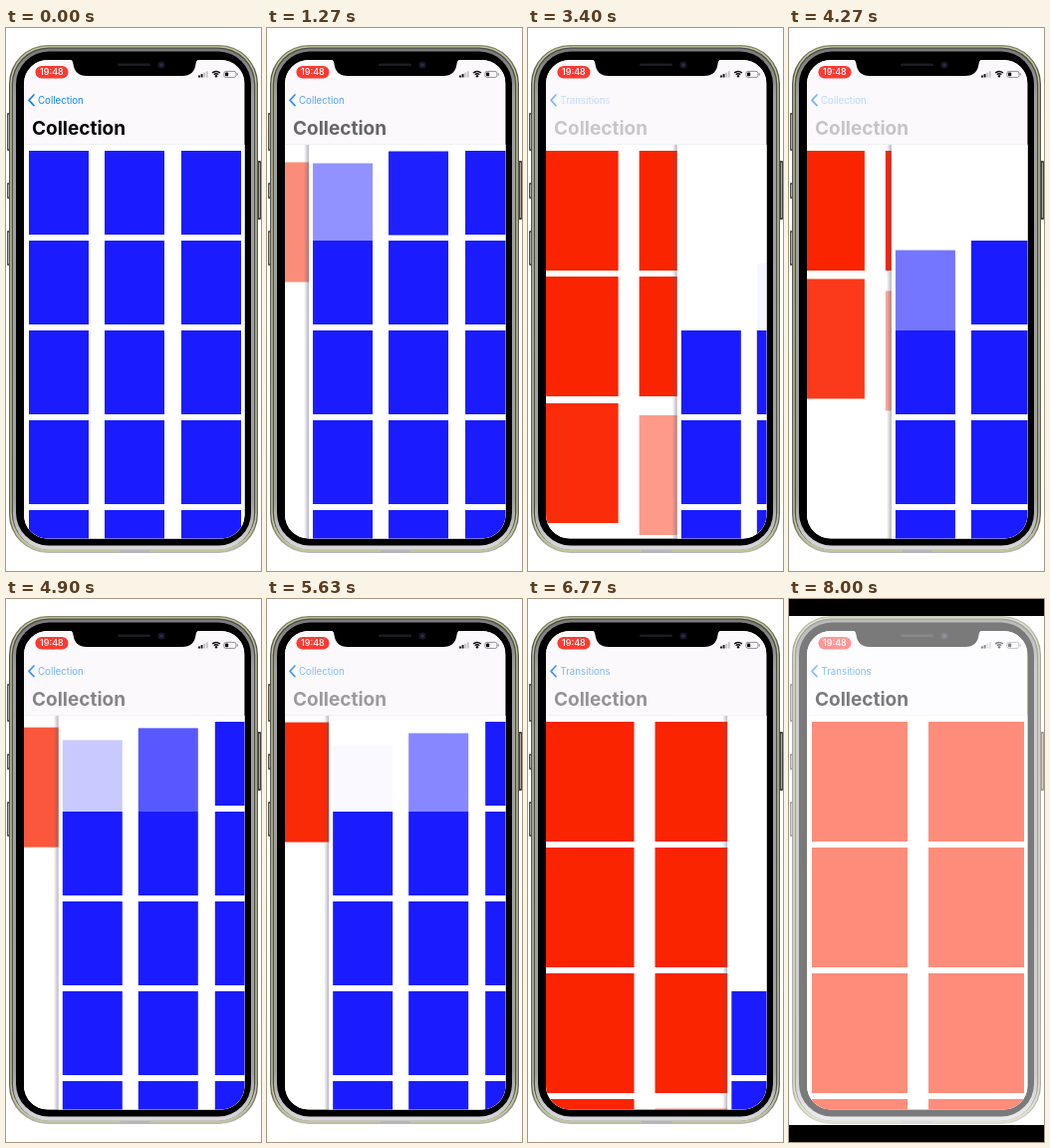
Write an HTML page with a canvas that moves like this. It is 256x544 px and loops after 8030 ms.

```html
<!DOCTYPE html>
<html lang="en">
<head>
<meta charset="utf-8">
<title>Collection transition</title>
<style>
  html, body { margin: 0; width: 100%; height: 100%; overflow: hidden; background: #fff; }
  canvas { display: block; width: 256px; height: 544px; }
</style>
</head>
<body>
<canvas id="stage" width="256" height="544"></canvas>
<script>
const ctx = document.getElementById('stage').getContext('2d');
const LOOP = 8030;
const SCREEN = { x: 18, y: 32, w: 221.5, h: 479.5, r: 24 };
const WIDTH = 221, NAV_BOTTOM = 117, DROP = 24, PARALLAX = 69.5;
const FONT = 'Inter, Roboto, sans-serif';
const BLUE_GRID = { color: '#1a1cff', xs: [23, 99, 176], w: 60, h: 84, step: 90, rows: 5 };
const RED_GRID = { color: '#fa2400', xs: [23, 140], w: 96, h: 120, step: 126, rows: 4 };

// Swipe progress: [time, progress, slope per second]
const SWIPE = [
  [250, 0, 0], [1270, 0.104, 0.25], [2370, 0.505, 0.28], [3050, 0.62, 0],
  [4270, 0.38, -0.28], [5130, 0.12, 0], [5630, 0.195, 0.35],
  [6770, 0.82, 0.55], [7300, 1, 0]
];

const clamp = v => Math.max(0, Math.min(1, v));

function progressAt(t) {
  if (t <= SWIPE[0][0]) return 0;
  for (let i = 1; i < SWIPE.length; i++) {
    const [t0, p0, m0] = SWIPE[i - 1], [t1, p1, m1] = SWIPE[i];
    if (t > t1) continue;
    const d = (t1 - t0) / 1000, u = (t - t0) / (t1 - t0), v = 1 - u;
    return clamp(v * v * (1 + 2 * u) * p0 + u * v * v * d * m0 +
      u * u * (3 - 2 * u) * p1 - u * u * v * d * m1);
  }
  return 1;
}

function rounded(x, y, w, h, r) {
  ctx.beginPath();
  ctx.roundRect(x, y, w, h, r);
}

function fillRounded(color, x, y, w, h, r) {
  ctx.fillStyle = color;
  rounded(x, y, w, h, r);
  ctx.fill();
}

function fillBox(color, x, y, w, h) {
  ctx.fillStyle = color;
  ctx.fillRect(x, y, w, h);
}

function label(text, x, y, font, color, alpha = 1) {
  ctx.globalAlpha = alpha;
  ctx.font = `${font} ${FONT}`;
  ctx.fillStyle = color;
  ctx.fillText(text, x, y);
  ctx.globalAlpha = 1;
}

// Cells come or go one after another while sliding vertically
function drawGrid(grid, p, dx, entering) {
  const cols = grid.xs.length;
  ctx.fillStyle = grid.color;
  for (let i = 0; i < grid.rows * cols; i++) {
    const k = clamp((p - i * 0.1) / 0.2);
    const alpha = entering ? (p >= 1 ? 1 : k) : 1 - k;
    if (alpha <= 0) continue;
    const x = grid.xs[i % cols] + dx;
    const y = 123 + Math.floor(i / cols) * grid.step + (1 - alpha) * DROP * 1;
    const next = 123 + (Math.floor(i / cols) + 1) * grid.step;
    const h = entering ? grid.h : Math.min(grid.h, next - y);
    ctx.globalAlpha = alpha;
    ctx.fillRect(x, y, grid.w, h);
  }
  ctx.globalAlpha = 1;
}

function drawCollections(p) {
  const edge = SCREEN.x + p * WIDTH;
  ctx.save();
  ctx.beginPath();
  ctx.rect(SCREEN.x, NAV_BOTTOM, WIDTH + 1, 400);
  ctx.clip();
  fillBox('#fff', SCREEN.x, NAV_BOTTOM, WIDTH + 1, 400);
  if (p > 0) drawGrid(RED_GRID, p, -PARALLAX * (1 - p), true);
  if (p < 1) {
    if (p > 0) {
      const shade = ctx.createLinearGradient(edge - 4, 0, edge + 1, 0);
      shade.addColorStop(0, 'rgba(90,90,110,0)');
      shade.addColorStop(1, 'rgba(90,90,110,0.45)');
      fillBox(shade, edge - 4, NAV_BOTTOM, 5, 400);
    }
    fillBox('#fff', edge + 1, NAV_BOTTOM, WIDTH, 400);
    drawGrid(BLUE_GRID, p, p * WIDTH, false);
  }
  ctx.restore();
}

function drawNav(p) {
  const away = Math.abs(1 - 2 * p);
  fillBox('#fbf9fc', SCREEN.x, SCREEN.y, SCREEN.w, NAV_BOTTOM - SCREEN.y);
  fillBox('#e9e7ec', SCREEN.x, NAV_BOTTOM - 0.5, SCREEN.w, 0.5);
  ctx.globalAlpha = 0.45 + 0.55 * away;
  ctx.strokeStyle = '#1683f5';
  ctx.lineWidth = 1.7;
  ctx.lineCap = ctx.lineJoin = 'round';
  ctx.beginPath();
  ctx.moveTo(28, 67);
  ctx.lineTo(23, 72.3);
  ctx.lineTo(28, 77.6);
  ctx.stroke();
  label('Collection', 32, 76, '9.7px', '#1683f5', (1 - p) ** 3);
  label('Transitions', 32.5, 76, '9.7px', '#1683f5', p ** 3);
  label('Collection', 26, 107, '700 19px', '#000', 0.2 + 0.8 * away ** 3);
}

function drawStatus() {
  fillRounded('#fb3a32', 29.5, 38, 33, 12.5, 6.2);
  label('19:48', 34, 47.4, '500 9px', '#fff');
  for (let i = 0; i < 4; i++) {
    fillBox(i < 2 ? '#111' : '#c4c4c8', 193 + i * 2.6, 47.5 - i * 1.4, 1.9, 2 + i * 1.4);
  }
  ctx.strokeStyle = '#111';
  ctx.lineCap = 'butt';
  ctx.lineWidth = 1.5;
  for (const r of [3, 5.3]) {
    ctx.beginPath();
    ctx.arc(211, 48.7, r, -Math.PI * 0.76, -Math.PI * 0.24);
    ctx.stroke();
  }
  ctx.fillStyle = '#111';
  ctx.beginPath();
  ctx.arc(211, 48.3, 1.2, 0, 7);
  ctx.fill();
  ctx.strokeStyle = '#77777c';
  ctx.lineWidth = 0.8;
  rounded(218.9, 43.4, 12, 6, 1.8);
  ctx.stroke();
  fillRounded('#111', 220, 44.5, 3.2, 3.8, 0.8);
  fillBox('#77777c', 231.7, 45.3, 1, 2.2);
}

function drawBody() {
  for (const [y, h] of [[85, 38], [155, 16], [203, 35]]) {
    fillRounded('#555', 1, y, 4, h, 1);
    fillBox('#aaa', 2, y + 2, 1, h - 4);
  }
  fillRounded('#444', 251, 133, 5, 59, 1);
  fillBox('#aaa', 254, 135, 1, 55);

  const rim = ctx.createLinearGradient(0, 17, 0, 526);
  rim.addColorStop(0, '#85866a');
  rim.addColorStop(0.06, '#55564a');
  rim.addColorStop(0.94, '#66675a');
  rim.addColorStop(1, '#b8b8bc');
  fillRounded(rim, 3, 17, 250, 509, 39);
  fillRounded('#c5c79a', 4.3, 18.2, 247.4, 506.5, 38);
  fillRounded('#4c4c4c', 5.7, 19.5, 244.6, 503, 37);
  const metal = ctx.createLinearGradient(0, 20, 0, 524);
  metal.addColorStop(0, '#7a7a7a');
  metal.addColorStop(0.1, '#a0a0a0');
  metal.addColorStop(0.9, '#a0a0a0');
  metal.addColorStop(1, '#dcdce0');
  fillRounded(metal, 7, 20.8, 242, 502, 36);
  fillRounded('#000', 10, 23.5, 236, 495, 33);
  fillBox('#b5b5ba', 114, 523, 30, 3);
}

function drawNotch() {
  ctx.fillStyle = '#000';
  ctx.beginPath();
  ctx.moveTo(62, 31);
  ctx.quadraticCurveTo(67, 31, 67.5, 36);
  ctx.quadraticCurveTo(69, 48, 81, 48);
  ctx.lineTo(177, 48);
  ctx.quadraticCurveTo(189, 48, 190.5, 36);
  ctx.quadraticCurveTo(191, 31, 196, 31);
  ctx.fill();
  fillRounded('#1c1c22', 112, 35.5, 33, 2.5, 1.2);
  ctx.fillStyle = '#17172a';
  ctx.beginPath();
  ctx.arc(156, 37, 3.6, 0, 7);
  ctx.fill();
  ctx.fillStyle = '#30304c';
  ctx.beginPath();
  ctx.arc(156, 37, 1.5, 0, 7);
  ctx.fill();
}

function draw(t) {
  const p = progressAt(t);
  fillBox('#fff', 0, 0, 256, 544);
  drawBody();
  ctx.save();
  rounded(SCREEN.x, SCREEN.y, SCREEN.w, SCREEN.h, SCREEN.r);
  ctx.clip();
  fillBox('#fff', SCREEN.x, SCREEN.y, SCREEN.w, SCREEN.h);
  drawCollections(p);
  drawNav(p);
  drawStatus();
  ctx.restore();
  drawNotch();

  // Closing flash with dark bars
  if (t >= 7995) {
    fillBox('rgba(255,255,255,0.48)', 0, 17, 256, 510);
    fillBox('#000', 0, 0, 256, 17);
    fillBox('#000', 0, 527, 256, 17);
  }
}

const start = performance.now();
function tick() {
  draw((performance.now() - start) % LOOP);
  requestAnimationFrame(tick);
}
tick();
</script>
</body>
</html>
```
